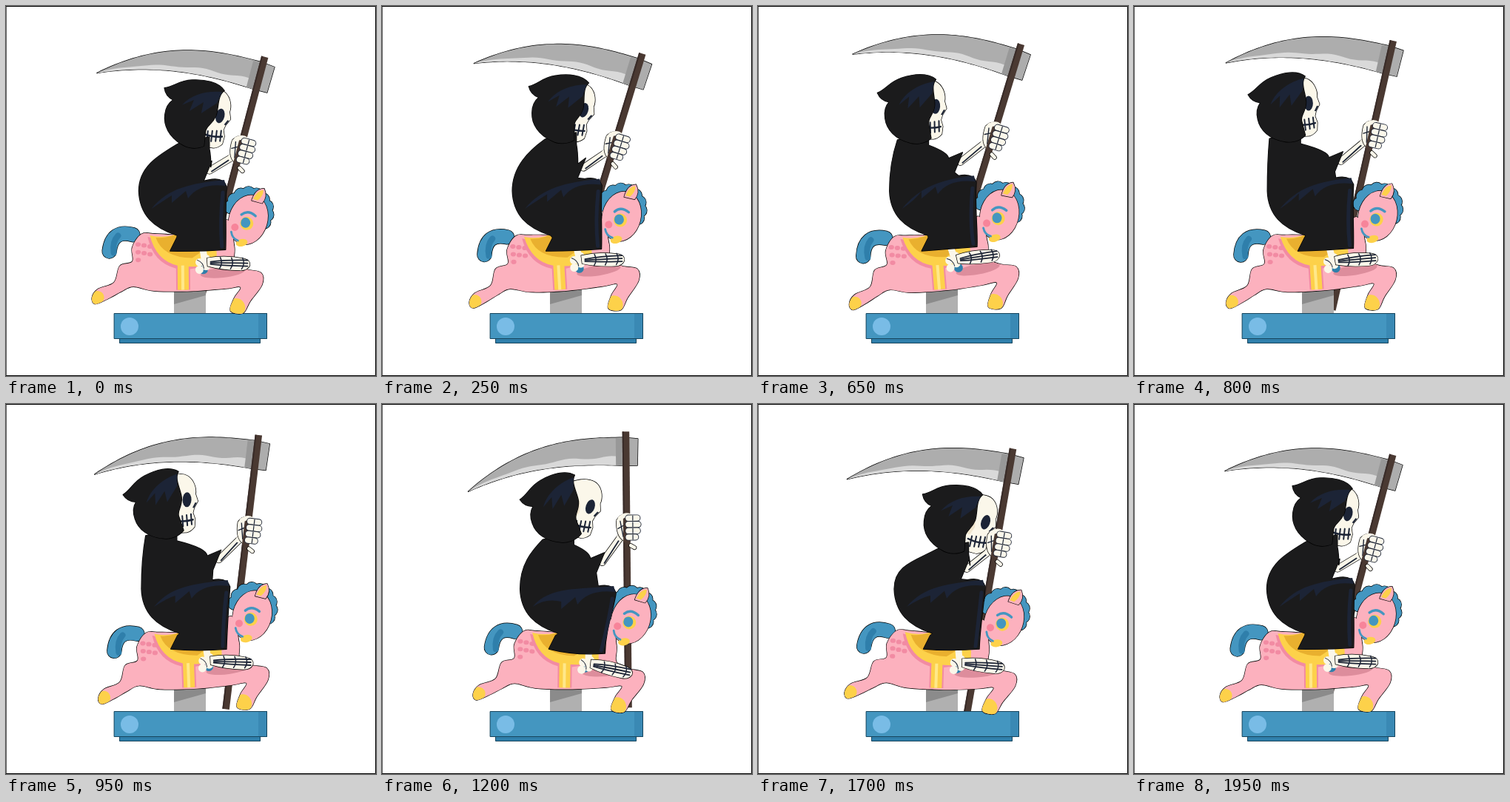
Recreate the animation shown at these times as an HTML page with a canvas. Size 500x500 px, loop 2000 ms.

```html
<!DOCTYPE html>
<html>
<head>
<meta charset="utf-8">
<title>Reaper on a rocking horse</title>
<style>
html, body { margin: 0; width: 100%; height: 100%; overflow: hidden; background: #fff; }
canvas { display: block; }
</style>
</head>
<body>
<canvas id="stage" width="500" height="500"></canvas>
<script>
const ctx = document.getElementById('stage').getContext('2d');
const PINK = '#fcb1be', ROSE = '#f28ba3', BLUE = '#4496c0', DEEP = '#2f7fab', YELLOW = '#fdd14a',
      GOLD = '#e9b02f', BLACK = '#1b1b1c', NAVY = '#1c2436', BONE = '#fbf7ea', WOOD = '#4a3932', INK = '#000';
const PERIOD = 1950, HOLD = 2000, STEP = 50;

const asPath = p => p instanceof Path2D ? p : new Path2D(p);

function line(path, color, width) {
  ctx.strokeStyle = color;
  ctx.lineWidth = width;
  ctx.lineCap = ctx.lineJoin = 'round';
  ctx.stroke(asPath(path));
}

function fill(path, color, outlined) {
  if (outlined) line(path, INK, 1.4);
  ctx.fillStyle = color;
  ctx.fill(asPath(path));
}

function tube(path, color, width) {
  line(path, INK, width + 1.4);
  line(path, color, width);
}

function oval(x, y, rx, ry, color, turn = 0) {
  ctx.beginPath();
  ctx.ellipse(x, y, rx, ry, turn, 0, 7);
  ctx.fillStyle = color;
  ctx.fill();
}

function rect(x, y, w, h, color) {
  ctx.fillStyle = color;
  ctx.fillRect(x, y, w, h);
}

const poly = points => 'M' + points.map(p => p.join(' ')).join('L') + 'Z';

// Smooth closed curve through the points.
function blob(points) {
  const n = points.length, at = i => points[(i + n) % n];
  const handle = (i, k) => at(i).map((v, j) => v + k * (at(i + 1)[j] - at(i - 1)[j]) / 6);
  const parts = points.map((p, i) => `C${handle(i, 1)} ${handle(i + 1, -1)} ${at(i + 1)}`);
  return new Path2D(`M${points[0]}${parts.join('')}Z`);
}

function posed([x, y, deg], draw) {
  ctx.save();
  ctx.translate(x, y);
  ctx.rotate(deg * Math.PI / 180);
  draw();
  ctx.restore();
}

// The whole ride is one swing plus a little of its second harmonic.
function poseAt(t) {
  const a = 2 * Math.PI * t / PERIOD;
  const c = Math.cos(a), s = Math.sin(a), c2 = Math.cos(2 * a), s2 = Math.sin(2 * a);
  const hx = 236.8 + 21 * c - 20 * s - 5 * c2 + 3.5 * s2;
  const hy = 146 + 4 * c - 7 * s - 3 * c2 - 3 * s2;
  return {
    scythe: [345 + 5 * c + 11 * s - 4.3 * s2, 53 + 13.8 * c + 5.6 * s + 2 * c2 - 2 * s2, 10.3 + 4.5 * c + 8 * s - 2.2 * s2],
    horse: [222.5 - 4.3 * c + s, 399.8 + s, -1.2 + .7 * c - 3.6 * s],
    foot: [269 - 2.5 * c - 6 * s + 1.5 * s2, 348 - .5 * c - 4.5 * s, 2 - c - 9 * s + 3 * s2],
    hood: [hx, hy, -12.5 + 13 * c + 1.5 * s - 3 * s2],
    face: [hx + 38.5 - 9 * s - 2 * c2, hy - 2.5 + 5.5 * c - 2 * s - 1.5 * c2, -.5 + 5 * c - 7 * s - 6 * c2 + 4 * s2],
    elbow: [282 - 7 * c - 11 * s + 3 * s2, 216.5 + 6 * c - 3 * s],
    knee: [304 - 3 * c - 11 * s - 3 * c2 + 3 * s2, 240 - 2 * c - 7 * s + 3 * s2],
    back: 181.5 - 2 * c - 5.5 * s
  };
}

function drawScythe() {
  const top = u => 8 + 71 * (1 - u) ** 2.6;
  const bottom = u => 43 + 36 * (1 - u) ** 2.6 + 3 * u ** 4;
  const shine = u => bottom(u) - 11 * u ** .6 - 2 * u * Math.sin(22 * u);
  const edge = f => Array.from({ length: 41 }, (_, i) => [-214 + 5.25 * i, f(i / 40)]);
  const under = edge(bottom).reverse();
  fill(poly([...edge(top), [16, 10], [15, 46], ...under]), '#adadad', true);
  fill(poly([...edge(shine), ...under]), '#d9d9d9');
  rect(-14, 9, 10, 37, '#989898');
  rect(-5, 0, 9.5, 373, WOOD);
  rect(-5, 0, 2, 373, '#382b28');
}

function drawBase() {
  rect(227, 380, 43, 36, '#b0b0b0');
  fill('M227 380H270V391L227 403Z', '#8b8b8b');
  rect(153, 449, 191, 6.5, DEEP);
  rect(146, 415, 207, 35, BLUE);
  rect(341, 415, 12, 35, '#3a89b4');
  line('M146.5 415.5H352.5V449.5H146.5ZM153.5 450V455.5H343.5V450', '#17455d', 1);
  oval(167, 433, 12, 12, '#79bce6');
}

function drawMane() {
  for (const [color, r] of [[INK, 9.7], [BLUE, 9]])
    for (let a = 195; a <= 395; a += 25) {
      const rad = a * Math.PI / 180;
      oval(329 + 25 * Math.cos(rad), 279 + 25 * Math.sin(rad), r, r, color);
    }
}

function drawHorseFace() {
  fill('M333 264Q338 248 350 248 355 259 347 268Z', PINK, true);
  fill('M335 262Q341 250 349 250 349 258 341 264Z', YELLOW);
  oval(310, 300, 5, 5, '#f7849a');
  oval(326, 295, 9, 9, YELLOW);
  oval(324.5, 294, 6.5, 7, BLUE);
  line('M319 283Q328 276 338 285', BLUE, 3.4);
  oval(319, 321, 8, 5, YELLOW, -.2);
  line('M305 306Q306 315 314 318', BLUE, 2.8);
}

function drawSaddle() {
  fill('M192 312Q199 347 230 355V384H249V356L280 351V330Z', ROSE);
  fill('M195 310Q220 316 240 304L285 332V350Q255 355 232 351 203 344 195 310Z', YELLOW);
  fill('M203 313Q222 315 240 304L272 328 252 341Q212 340 203 313Z', GOLD);
  rect(232, 349, 15, 35, YELLOW);
  rect(237, 351, 4, 33, '#ffe88a');
}

function drawHorse() {
  ctx.translate(-218, -400);
  tube('M172 309Q144 301 140 331', BLUE, 19);
  line('M152 310Q144 318 146 333', DEEP, 8);
  drawMane();
  const body = blob([[205, 308], [184, 308], [171, 326], [171, 345], [154, 351], [146, 373], [124, 382],
    [116, 394], [121, 402], [140, 394], [155, 386], [172, 379], [200, 385], [250, 386], [296, 383],
    [317, 381], [308, 396], [303, 413], [320, 416], [330, 400], [346, 378], [345, 362], [325, 357],
    [309, 348], [309, 326], [300, 290], [270, 310]]);
  oval(328, 290, 26.7, 34.7, INK, .3);
  fill(body, PINK, true);
  oval(328, 290, 26, 34, PINK, .3);
  ctx.save();
  ctx.clip(body);
  oval(121, 395, 12, 10, YELLOW, -.6);
  oval(311, 409, 12, 13, YELLOW);
  ctx.restore();
  for (let i = 0; i < 7; i++)
    oval(179 + i % 3 * 8, 322 + i * 3.5 - i % 3 * 2, 3.6, 3, ROSE);
  drawHorseFace();
  drawSaddle();
  oval(293, 361, 30, 7, '#dd8d9c', -.1);
  oval(267, 357, 6, 6, DEEP);
}

function drawFoot() {
  line('M-1-20 2-3', BONE, 9);
  for (let i = 0; i < 4; i++) oval(i % 2 ? 4 : -5, 9 - i * 5, 5.5, 5.5, BONE);
  line('M-8-4Q0-1 1 7', NAVY, 1);
  fill('M5-7Q30-12 55-7 64-5 63 2 60 9 50 9 25 9 6 4Z', BONE, true);
  for (let y = -5; y < 5; y += 4) line(`M10 ${y * .4}Q30 ${y} 60 ${y}`, NAVY, 1.8);
  for (let x = 23; x < 55; x += 15) line(`M${x}-8Q${x + 4} 0 ${x - 1} 7`, NAVY, 1.5);
}

function drawFace() {
  fill('M-40-20C-30-37-2-41 8-31 15-24 16-12 13-5L14 5 7 13 4 19 5 28 2 38Q-4 43-10 43L-21 41-36 28Z', BONE, true);
  fill('M-24-20Q-12-10-14 8L-20 18-36 14Z', '#f1e6cf');
  oval(0, 0, 6, 10, NAVY, .25);
  fill('M10 6 12 7 7 13 5 12Z', NAVY);
  line('M-22 24Q-10 29 2 28', NAVY, 2.4);
  for (let x = -18; x < 2; x += 6) line(`M${x + 1} 20 ${x - 1} 34`, NAVY, 2);
}

function drawForearm([ex, ey], [sx, sy, deg]) {
  const a = deg * Math.PI / 180, c = Math.cos(a), s = Math.sin(a);
  const wx = sx - 9 * c - 143 * s, wy = sy + 143 * c - 9 * s;
  tube(`M${ex} ${ey}L${wx} ${wy}`, BONE, 8.6);
  line(`M${ex + 3} ${ey + 1}L${wx} ${wy + 1}`, NAVY, 1.8);
  oval(wx, wy, 5, 5, BONE);
}

function drawHand() {
  fill('M-14 120Q-9 110 2 112L10 116V144L-4 148Q-15 142-14 120Z', BONE, true);
  line('M-9 121-5 142M-12 131-3 126', NAVY, 1.4);
  rect(-5, 116, 9.5, 34, WOOD);
  line('M-9 117Q-2 111 4 114', BONE, 6);
  for (let i = 0; i < 4; i++) {
    const y = 117 + i * 8.6, x = 14 + 2 * Math.sin(i * 1.1) - i * .7;
    line(`M2 ${y}H${x}`, NAVY, 9.2);
    line(`M2 ${y}H${x}`, BONE, 7.4);
    line(`M8 ${y - 3}V${y + 3}`, NAVY, 1.2);
  }
  tube('M5 154 10 157', BONE, 4.6);
}

function drawRobe([hx, hy], [ex, ey], [kx, ky], b) {
  const hemL = 222 + (kx - 299) * .2, hemR = 297 + (kx - 299) * .25, hemY = 330 + (ky - 239) * .7;
  const notch = Math.max(hx + 24, ex - 16);
  fill(`M${hx - 20} ${hy + 39}C${(hx - 20 + b) / 2} ${hy + 55} ${b} 217 ${b} 250
    C${b + 1} 282 ${b + 20} 300 ${b + 52} 310L${hemL + 9} 313 ${hemL} 331
    Q${hemL + 35} ${hemY + 3} ${hemR} ${hemY}C${hemR + 1} 300 ${kx - 2} 275 ${kx} ${ky + 6}
    Q${kx - 4} ${ky - 7} ${kx - 24} ${ky - 3}L${ex - 8} ${ey + 14} ${ex + 3} ${ey - 13}
    L${notch} ${ey - 5}Q${notch} ${hy + 56} ${hx + 22} ${hy + 46}V${hy + 30}Z`, BLACK, true);
  fill(`M${b + 17} 274C${b + 40} 246 ${kx - 50} ${ky + 2} ${kx - 3} ${ky - 3}L${kx - 1} ${ky + 5}
    C${kx - 25} ${ky + 2} ${kx - 42} ${ky + 8} ${kx - 52} ${ky + 22}L${kx - 55} ${ky + 12}
    ${kx - 74} ${ky + 28}V${ky + 18}Q${b + 35} 262 ${b + 17} 274Z`, NAVY);
  line(`M${kx - 5} ${ky + 14}Q${kx - 9} 290 ${hemR - 5} ${hemY - 4}`, NAVY, 5);
}

function drawHood() {
  fill('M-39-36C-25-38-20-46-2-47 15-48 34-45 42-33 32-26 35-10 31 1 26 13 18 14 17 22L15 42C5 47-8 45-15 40-32 30-40 15-38 0-37-10-33-16-27-20-34-23-38-29-39-36Z', BLACK, true);
  fill('M39-31C20-33-2-28-15-13L1-20-5-5 14-17 11-2 32-16Z', NAVY);
}

function draw(now) {
  const t = Math.floor(now % HOLD / STEP) * STEP;
  const pose = poseAt(t);
  rect(0, 0, 500, 500, '#fff');
  posed(pose.scythe, drawScythe);
  drawBase();
  posed(pose.horse, drawHorse);
  posed(pose.foot, drawFoot);
  posed(pose.face, drawFace);
  drawForearm(pose.elbow, pose.scythe);
  posed(pose.scythe, drawHand);
  drawRobe(pose.hood, pose.elbow, pose.knee, pose.back);
  posed(pose.hood, drawHood);
  line('M.5 .5H499.5V499.5H.5Z', INK, 1);
}

const start = performance.now();
function tick() {
  draw(performance.now() - start);
  requestAnimationFrame(tick);
}
tick();
</script>
</body>
</html>
```
